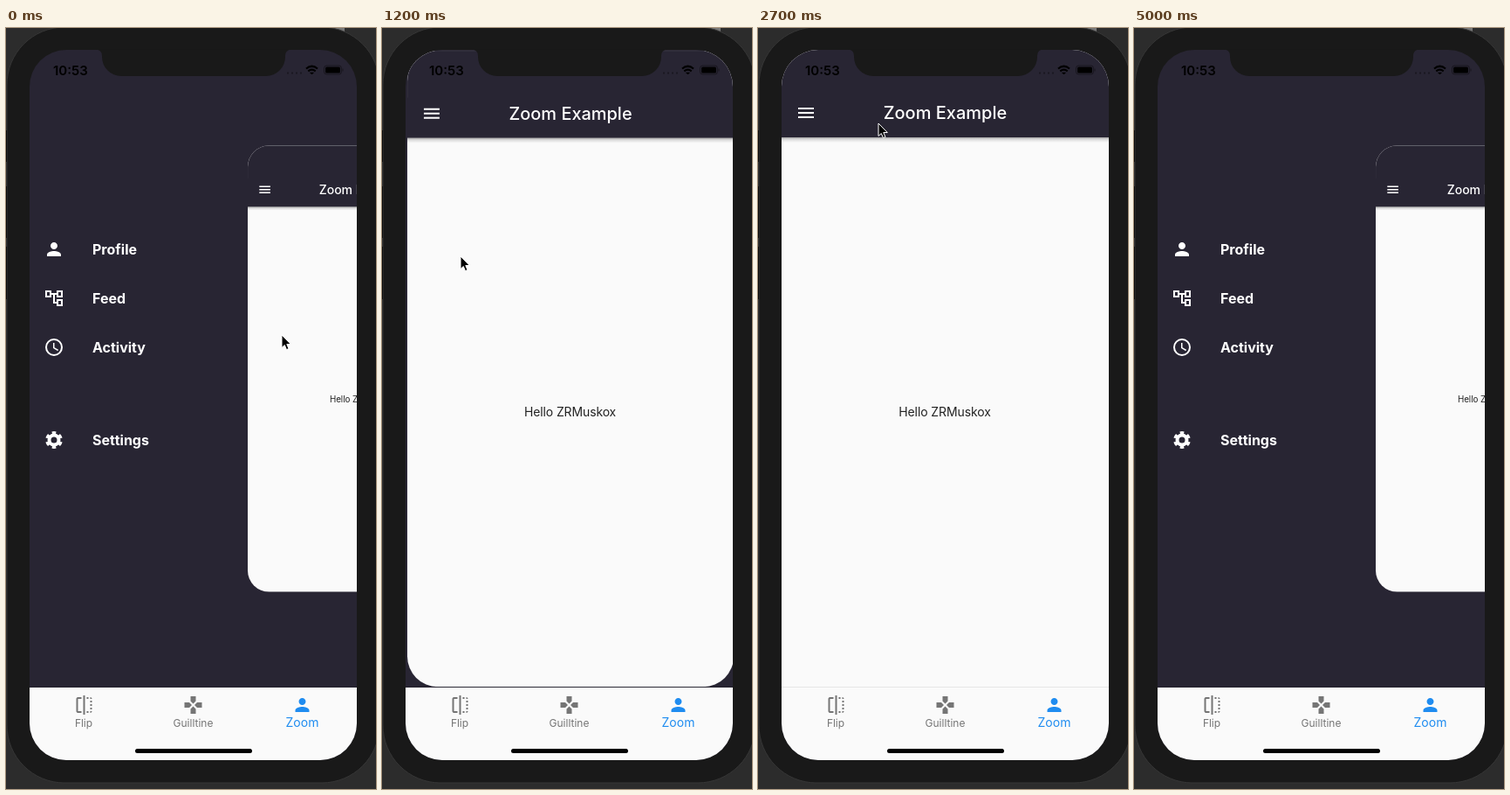
Recreate the animation shown at these times as an HTML page. Size 424x870 px, loop 5.5 s.

```html
<!DOCTYPE html>
<html lang="en">
<head>
<meta charset="utf-8">
<title>Zoom drawer</title>
<style>
  html, body { margin: 0; height: 100%; overflow: hidden; background: #2c2c2c; }
  svg { display: block; width: 424px; height: 870px; font-family: Inter, "Open Sans", sans-serif; }
  .center { text-anchor: middle; }
  .menu { fill: #fff; font-size: 16px; font-weight: 700; }
  .tab { fill: #757575; font-size: 12px; }
  .active { fill: #1f8cf0; font-size: 14px; }
</style>
</head>
<body>
<svg viewBox="0 0 424 870">
  <defs>
    <clipPath id="screenClip"><rect x="27" y="25" width="375" height="812" rx="42"/></clipPath>
    <clipPath id="pageClip"><rect id="pageShape" width="375" height="729"/></clipPath>
    <linearGradient id="shade" x2="0" y2="1">
      <stop stop-opacity=".34"/><stop offset=".4" stop-opacity=".12"/><stop offset="1" stop-opacity="0"/>
    </linearGradient>
    <path id="person" d="M12 12c2.21 0 4-1.79 4-4s-1.79-4-4-4-4 1.79-4 4 1.79 4 4 4zm0 2c-2.67 0-8 1.34-8 4v2h16v-2c0-2.66-5.33-4-8-4z"/>
    <path id="tree" d="M22 11V3h-7v3H9V3H2v8h7V8h2v10h4v3h7v-8h-7v3h-2V8h2v3h7zM7 9H4V5h3v4zm10 6h3v4h-3v-4zm0-10h3v4h-3V5z"/>
    <g id="clock" fill="none" stroke="#fff">
      <circle cx="12" cy="12" r="9" stroke-width="2"/>
      <path d="M11.75 7v5.6l4.9 2.9" stroke-width="1.5"/>
    </g>
    <g id="gear" fill="none" stroke="#fff">
      <circle cx="12" cy="12" r="5.5" stroke-width="4"/>
      <circle cx="12" cy="12" r="8.2" stroke-width="3.4" pathLength="6" stroke-dasharray=".52 .48" stroke-dashoffset="-.24"/>
    </g>
    <path id="flip" d="M15 21h2v-2h-2v2zm4-12h2V7h-2v2zM3 5v14c0 1.1.9 2 2 2h4v-2H5V5h4V3H5c-1.1 0-2 .9-2 2zm16-2v2h2c0-1.1-.9-2-2-2zm-8 20h2V1h-2v22zm8-6h2v-2h-2v2zM15 5h2V3h-2v2zm4 8h2v-2h-2v2zm0 8c1.1 0 2-.9 2-2h-2v2z"/>
    <path id="pad" d="M15 7.5V2H9v5.5l3 3 3-3zM7.5 9H2v6h5.5l3-3-3-3zM9 16.5V22h6v-5.5l-3-3-3 3zM16.5 9l-3 3 3 3H22V9h-5.5z"/>
  </defs>

  <!-- phone body -->
  <rect width="424" height="870" fill="#2c2c2c"/>
  <rect x="340" width="48" height="6" fill="#777"/>
  <rect x="1" y="-1" width="427" height="864" rx="66" fill="#191919" stroke="#363636"/>
  <path d="M.5 117v36m0 28v59m0 10v60" stroke="#0c0c0c"/>

  <g clip-path="url(#screenClip)">
    <rect x="27" y="25" width="375" height="812" fill="#282533"/>
    <g id="menu" class="menu"></g>

    <g id="page">
      <g clip-path="url(#pageClip)">
        <rect width="375" height="729" fill="#fafafa"/>
        <rect width="375" height="100" fill="#282533"/>
        <rect y="100" width="375" height="6" fill="url(#shade)"/>
        <path d="M19 66h18m-18 5h18m-18 5h18" transform="translate(0 1)" stroke="#fff" stroke-width="2"/>
        <text class="center" x="187.5" y="79" fill="#fff" font-size="20" font-weight="500">Zoom Example</text>
        <text class="center" x="187" y="419" fill="#222" font-size="14" letter-spacing="-.1">Hello ZRMuskox</text>
      </g>
      <path id="edge" d="M.5 54V35A34.5 34.5 0 0 1 35 .5H340A34.5 34.5 0 0 1 374.5 35" fill="none" stroke="#fff" stroke-opacity=".05"/>
    </g>

    <!-- tab bar -->
    <rect x="27" y="753" width="375" height="1" opacity=".08"/>
    <rect x="27" y="754" width="375" height="83" fill="#fafafa"/>
    <g class="tab center">
      <use href="#flip" x="77.5" y="762"/><text x="89" y="799">Flip</text>
      <use href="#pad" x="202.5" y="762"/><text x="214.5" y="799">Guilltine</text>
      <g class="active"><use href="#person" x="327.5" y="762"/><text x="339.5" y="799">Zoom</text></g>
    </g>
    <rect x="148" y="824" width="134" height="5" rx="2.5"/>
  </g>

  <!-- notch and status bar -->
  <path d="M103 24.500Q110 25 110 32V33A22 22 0 0 0 132 55H298A22 22 0 0 0 320 33V32Q320 25 327 24.500Z" fill="#191919"/>
  <text x="54" y="53.500" font-size="15" font-weight="600">10:53</text>
  <path d="M322 51.500h18" stroke="#000" stroke-opacity=".35" stroke-width="2" stroke-dasharray="2 3"/>
  <g fill="none" stroke="#000" stroke-width="2.200">
    <path d="M344 46.500q6.500-5.500 13 0M346.300 49.300q4.200-3.500 8.400 0"/>
    <path d="M348.500 51l2 2 2-2z" fill="#000" stroke-width=".6"/>
  </g>
  <rect x="364.500" y="43" width="20" height="10" rx="3" fill="none" stroke="#000" stroke-opacity=".4"/>
  <rect x="366" y="44.500" width="17" height="7" rx="1.600"/>
  <path d="M386 46.500v3" stroke="#000" stroke-opacity=".4"/>

  <g id="pointer">
    <circle id="ring" cy="2" r="19.800" fill="none" stroke="#000" stroke-width="3"/>
    <path d="M0 0V14.500L3.300 11.500 5.500 16.700 8 15.600 5.800 10.500H10.300Z" stroke="#fff"/>
  </g>
</svg>
<script>
const $ = id => document.getElementById(id);
const LOOP = 5500, STEP = 100, OPEN = 250;

$('menu').innerHTML = [
  ['person', 'Profile', 253], ['tree', 'Feed', 309], ['clock', 'Activity', 365], ['gear', 'Settings', 471]
].map(([icon, label, y]) =>
  `<use href="#${icon}" x="43" y="${y - 12}"/><text x="99" y="${y + 6}">${label}</text>`).join('');

// time, drawer offset, pointer x, pointer y
const keys = [
  [0, 250, 316, 351], [100, 250, 317, 353], [200, 250, 317, 353], [300, 240, 306, 354],
  [400, 200, 263, 357], [500, 149, 210, 359], [600, 112, 172, 362], [800, 74, 135, 365],
  [1000, 74, 135, 365], [1100, 30, 118, 318], [1200, 2, 90, 261], [1300, 0, 75, 218],
  [1600, 0, 55, 159], [1700, 0, 65, 178], [1800, 0, 65, 178], [1900, 0, 73, 181],
  [2000, 47, 120, 182], [2300, 56, 129, 184], [2400, 56, 129, 184], [2500, 30, 131, 170],
  [2600, 2, 135, 138], [2700, 0, 138, 109], [3000, 0, 113, 108], [3300, 0, 69, 265],
  [3400, 0, 69, 265], [3500, 14, 88, 272], [3800, 194, 270, 289], [4000, 194, 270, 289],
  [4200, 243, 255, 330], [4300, 250, 243, 362], [4500, 250, 222, 406], [4900, 250, 14, 4],
  [LOOP, 250, 14, 4]
];
const presses = [[300, 1100], [1900, 2500], [3500, 4100]];

function sample(t) {
  const i = keys.findIndex(k => k[0] > t), a = keys[i - 1], b = keys[i];
  const u = (t - a[0]) / (b[0] - a[0]);
  return a.map((v, j) => v + (b[j] - v) * u);
}

function draw(now) {
  const t = Math.floor(now % LOOP / STEP) * STEP;
  const [, offset, x, y] = sample(t);
  const scale = 1 - 0.3 * offset / OPEN;
  $('page').setAttribute('transform', `translate(${27 + offset} 389.5) scale(${scale}) translate(0 -364.5)`);
  $('pageShape').setAttribute('rx', offset ? 35 : 0);
  $('edge').style.display = offset ? '' : 'none';
  $('pointer').setAttribute('transform', `translate(${x} ${y})`);
  $('pointer').style.display = t < 5000 ? '' : 'none';
  $('ring').style.display = presses.some(([from, to]) => t >= from && t < to) ? '' : 'none';
}

const start = performance.now();
function tick() {
  draw(performance.now() - start);
  requestAnimationFrame(tick);
}
tick();
</script>
</body>
</html>
```
